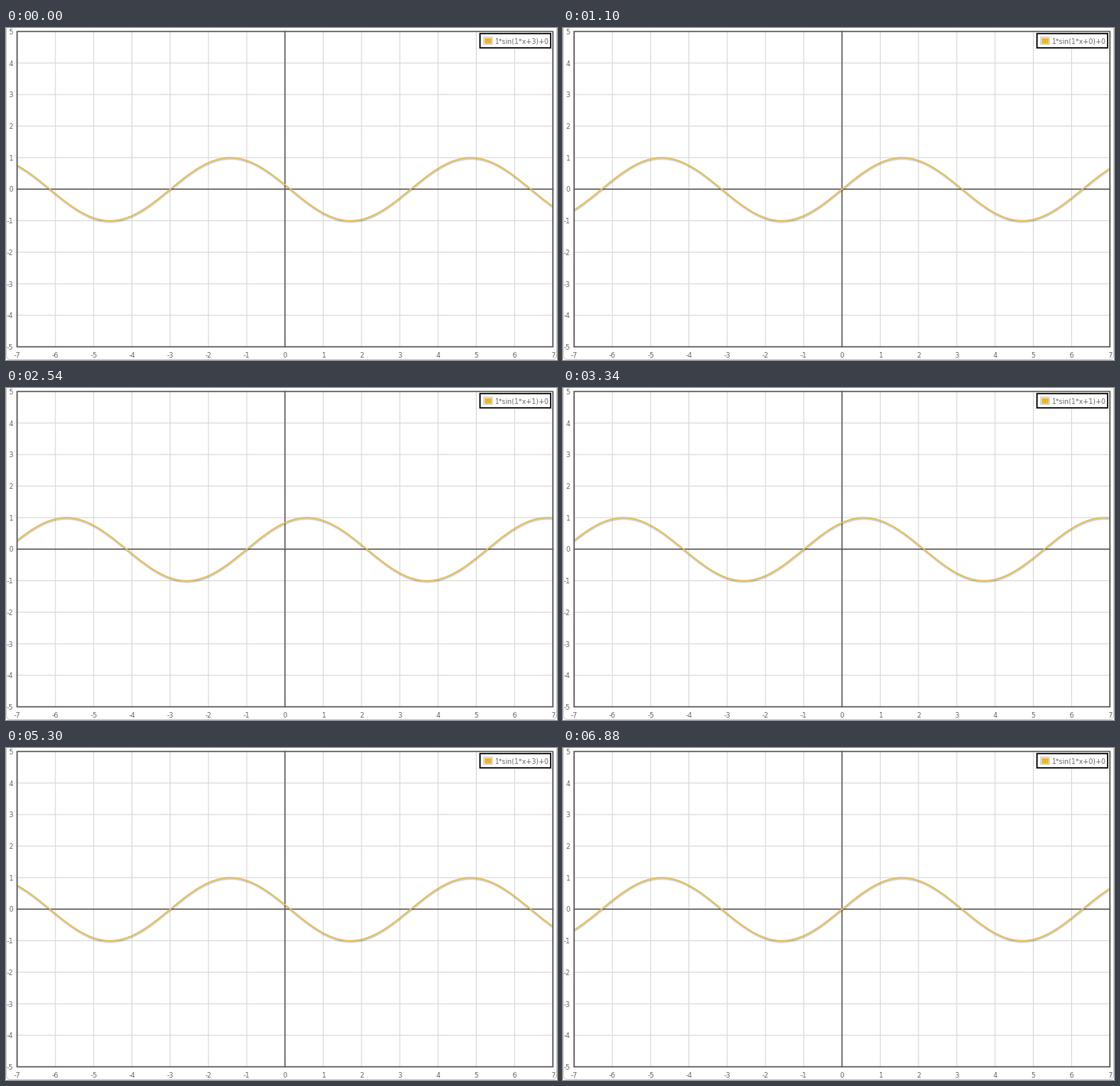
A matplotlib script for the animation above (6.9 s loop, 694 by 418 pixels).

```python
import numpy as np
import matplotlib.pyplot as plt
from matplotlib.animation import FuncAnimation
from matplotlib.patches import Rectangle

W, H, DPI = 694, 418, 100
STEP = 100                     # ms per frame
LOOP = 6900
FIRST, HOLD = 1100, 1400       # first phase change, time between changes

INK = "#5a5a5a"
GRID = "#dadada"
EDGE = "#c8c8c8"
GOLD = "#e6bf55"
SWATCH = "#e6b634"
FONT = dict(family="DejaVu Sans", color="#6a6a6a")


def px(n):
    """Pixels to points."""
    return n * 72 / DPI


def sx(x):
    return 351.4 + 48.2 * x


def sy(y):
    return 202.9 - 39.7 * y


fig = plt.figure(figsize=(W / DPI, H / DPI), dpi=DPI, facecolor="white")
ax = fig.add_axes([0, 0, 1, 1])
ax.set_xlim(0, W)
ax.set_ylim(H, 0)
ax.axis("off")

LEFT, RIGHT, TOP, BOTTOM = sx(-7), sx(7), sy(5), sy(-5)


def line(xs, ys, color, width, z, **kw):
    return ax.plot(xs, ys, color=color, lw=px(width), zorder=z,
                   snap=False, **kw)[0]


def label(x, y, s, ha, size=8.7):
    return ax.text(x, y, s, ha=ha, va="baseline", fontsize=px(size),
                   zorder=8, **FONT)


def box(x, y, w, h, z, fill="none", edge="none", width=0):
    ax.add_patch(Rectangle((x, y), w, h, fc=fill, ec=edge, lw=px(width),
                           joinstyle="miter", snap=False, zorder=z))


def rule(i, xs, ys):
    """Grid line, darker through zero."""
    line(xs, ys, INK if i == 0 else GRID, 1.5 if i == 0 else 1.1,
         2 if i == 0 else 1)


# Grid, zero axes and tick labels
for i in range(-7, 8):
    if abs(i) < 7:
        rule(i, [sx(i)] * 2, [TOP, BOTTOM])
    label(sx(i), 415, str(i), "center")
for j in range(-5, 6):
    if abs(j) < 5:
        rule(j, [LEFT, RIGHT], [sy(j)] * 2)
    label(9, sy(j) + 3.5, str(j), "right")
box(LEFT, TOP, RIGHT - LEFT, BOTTOM - TOP, 5, edge=INK, width=1.6)

# Page edge with rounded lower corners
bend = np.linspace(0, np.pi / 2, 12)
arc_x, arc_y = 5 * np.cos(bend), H - 5.5 + 5 * np.sin(bend)
line(np.r_[0.5, 5.5 - arc_x, W - 5.5 + arc_x[::-1], W - 0.5],
     np.r_[0, arc_y, arc_y[::-1], 0], EDGE, 1, 1)

# Curve with two soft shadow strokes
xs = np.linspace(-7, 7, 400)
SHADOWS = [(0.3, 1.7, 2.7), (0.2, 1.2, 2.1)]
shadows = [line(sx(xs) + dx, sy(xs), "black", w, 3, alpha=0.1)
           for dx, _, w in SHADOWS]
curve = line(sx(xs), sy(xs), GOLD, 1.7, 4)
clip = Rectangle((LEFT, TOP), RIGHT - LEFT, BOTTOM - TOP,
                 transform=ax.transData)
for stroke in shadows + [curve]:
    stroke.set_clip_path(clip)

# Legend
box(597, 7, 89, 18, 6, fill="white", edge="black", width=1.6)
box(601.5, 11.5, 11, 9, 7, fill="white", edge="#cccccc", width=1)
box(602.7, 12.7, 9, 7, 7.5, fill=SWATCH)
formula = label(615, 19.6, "", "left", 8.5)


def update(k):
    changes = (k * STEP - FIRST) // HOLD + 1
    phase = (3 + changes) % 4
    ys = sy(np.sin(xs + phase))
    curve.set_ydata(ys)
    for stroke, (_, dy, _) in zip(shadows, SHADOWS):
        stroke.set_ydata(ys + dy)
    formula.set_text(f"1*sin(1*x+{phase})+0")
    return [curve, formula, *shadows]


anim = FuncAnimation(fig, update, frames=LOOP // STEP, interval=STEP,
                     repeat=True, repeat_delay=0, blit=False)
plt.show()
```
